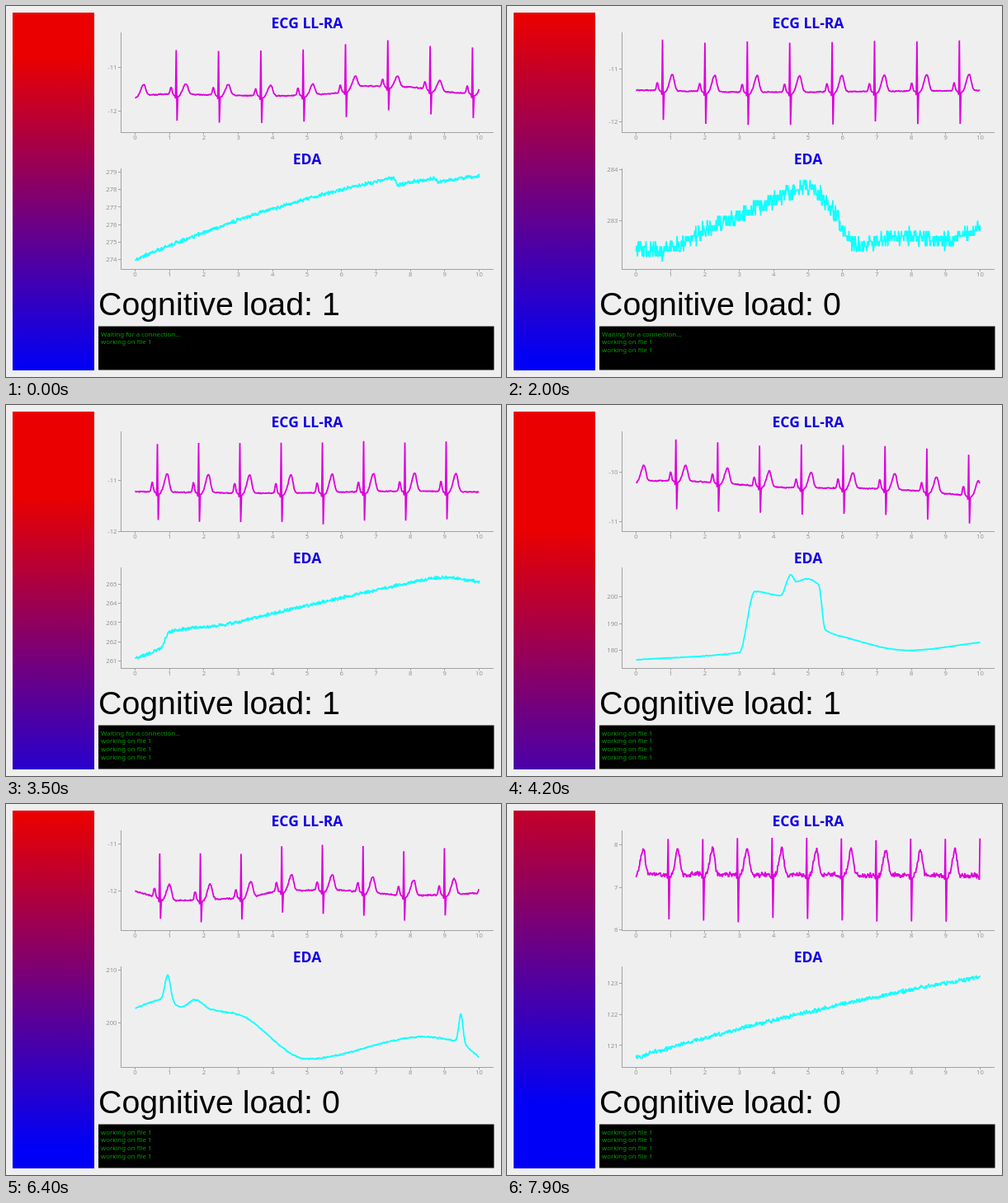
Recreate the animation shown at these times as an HTML page with a canvas. Size 600 by 450 pixels, loop 8 s.

```html
<!DOCTYPE html>
<html lang="en">
<head>
<meta charset="utf-8">
<title>Cognitive load monitor</title>
<style>
html, body { margin: 0; width: 100%; height: 100%; overflow: hidden; background: #f0eff0; }
canvas { display: block; width: 600px; height: 450px; }
</style>
</head>
<body>
<canvas id="stage" width="600" height="450"></canvas>
<script>
const g = document.getElementById('stage').getContext('2d');
const UI = '"Noto Sans", "Open Sans", sans-serif';
const LOOP = 8000, FIRST = 800, STEP = 1400;
const X0 = 156.5, SECOND = 41.7, X1 = X0 + 10 * SECOND;

const bump = (d, w) => Math.exp(-d * d / (2 * w * w));
const rise = (d, w) => 1 / (1 + Math.exp(-d / w));

function random(seed) {
  let s = seed * 7919 + 17;
  return () => {
    s = (s * 1664525 + 1013904223) % 4294967296;
    return s / 4294967296;
  };
}

// Smooth curve through t, v pairs that never overshoots them.
function curve(...p) {
  const n = p.length / 2, t = i => p[2 * i], v = i => p[2 * i + 1];
  const rate = i => (v(i + 1) - v(i)) / (t(i + 1) - t(i));
  const slope = i => {
    if (i === 0) return rate(0);
    if (i === n - 1) return rate(n - 2);
    const a = rate(i - 1), b = rate(i);
    return a * b > 0 ? 2 * a * b / (a + b) : 0;
  };
  return x => {
    let i = 0;
    while (i < n - 2 && x > t(i + 1)) i++;
    const h = t(i + 1) - t(i), k = (x - t(i)) / h, m = 1 - k;
    return v(i) * (1 + 2 * k) * m * m + slope(i) * h * k * m * m
      + v(i + 1) * k * k * (3 - 2 * k) - slope(i + 1) * h * k * k * m;
  };
}

// bar: where the red-to-blue fade starts and ends
// axis: a tick value, its y, pixels per unit, tick step
// ecg: base is y over seconds; first and gap place the spikes;
//      up, down, p and t are wave heights in pixels
// eda: value over seconds
const scenes = [
  {
    load: 1, bar: [60, 440],
    ecg: {
      axis: [-11, 74, 53, 1], first: 206.3, gap: 51.3, up: 55, down: 29, p: 9, t: 13, noise: 0.8,
      base: curve(0, 109, 1, 107, 4, 109, 5.8, 106, 6.6, 97, 8, 98.5, 9, 104, 10, 107)
    },
    eda: {
      axis: [279, 201, 21.2, 1], noise: 2.3,
      value: t => 273.95 + 0.85 * t - 0.03 * t * t - 0.45 * rise(t - 7.57, 0.02) - 0.25 * rise(t - 8.75, 0.02)
    }
  },
  {
    load: 0, bar: [12, 430],
    ecg: {
      axis: [-11, 76, 64, 1], first: 188.5, gap: 51.4, up: 60, down: 36, p: 10, t: 20, noise: 0.7,
      base: curve(0, 102, 3.5, 104.5, 10, 102.5)
    },
    eda: {
      axis: [284, 198, 62, 1], noise: 9, quant: 6.2,
      value: curve(0, 282.45, 0.7, 282.4, 2, 282.79, 3.4, 283.2, 5, 283.65, 5.7, 283.2, 6.4, 282.5, 7.7, 282.7, 9, 282.6, 10, 282.85)
    }
  },
  {
    load: 1, bar: [110, 510],
    ecg: {
      axis: [-11, 91, 61.5, 1], first: 183.5, gap: 50, up: 60, down: 34, p: 12, t: 22, noise: 0.7,
      base: curve(0, 105, 4, 107, 8, 104.5, 10, 105.5)
    },
    eda: {
      axis: [265, 217, 23.2, 1], noise: 2.1,
      value: curve(0, 261.1, 0.75, 261.65, 1, 262.5, 2.5, 262.85, 4, 263.45, 8, 265.05, 9, 265.35, 10, 265.1)
    }
  },
  {
    load: 1, bar: [150, 575],
    ecg: {
      axis: [-10, 81, 60, 1], first: 204.7, gap: 50.7, up: 51, down: 31, p: 11, t: 19, noise: 0.8,
      base: curve(0, 92, 1, 92, 4.4, 100, 7, 101.5, 10, 111)
    },
    eda: {
      axis: [200, 232, 3.25, 10], noise: 0.4,
      value: curve(0, 176.3, 3, 179, 3.45, 201.8, 4.2, 200.3, 4.5, 208, 4.65, 205.5, 4.95, 206.5, 5.3, 204.5, 5.5, 187.5, 6.1, 184.6, 7.9, 179.8, 10, 182.8)
    }
  },
  {
    load: 0, bar: [55, 510],
    ecg: {
      axis: [-10, 33, 60, 1], first: 184, gap: 47, up: 56, down: 33, p: 10, t: 20, noise: 1.5,
      base: curve(0, 107, 3, 112, 4.6, 104.5, 10, 103)
    },
    eda: {
      axis: [230, 202, 3.9, 10], noise: 0.9,
      value: t => -17 * rise(t - 4.82, 0.001) + curve(0, 229, 0.8, 228.4, 1, 227, 2, 225.6, 3.5, 225.6, 3.9, 221.5, 4.2, 222.6, 5.1, 219.5, 5.5, 221.4, 6.2, 221.1, 6.7, 224.8, 10, 225.9)(t)
    }
  },
  {
    load: 0, bar: [12, 415],
    ecg: {
      axis: [-11, 48, 56.5, 1], first: 186.3, gap: 49.3, up: 55, down: 26, p: 11, t: 19, noise: 1.1,
      base: curve(0, 106, 1.2, 117, 3.3, 113, 4.3, 105, 5.8, 104.5, 8, 111, 10, 108)
    },
    eda: {
      axis: [210, 201, 6.4, 10], noise: 0.9,
      value: t => 4.9 * bump(t - 0.95, 0.08) + 5.4 * bump(t - 9.47, 0.06)
        + curve(0, 202.7, 0.8, 204.3, 1.35, 203, 1.75, 204.3, 2.2, 202.5, 3, 201.5, 5, 193.1, 8.4, 197.3, 9.4, 196.3, 10, 193.4)(t)
    }
  },
  {
    load: 0, bar: [-62, 365],
    ecg: {
      axis: [8, 49, 51.5, 1], first: 195.3, gap: 42, up: 44, down: 53, p: 0, t: 31, noise: 3.3,
      base: curve(0, 85, 10, 87)
    },
    eda: {
      axis: [123, 217, 37.7, 1], noise: 2.6,
      value: t => 120.6 + 0.325 * t - 0.0065 * t * t
    }
  }
];

function ecgPoints(e, seed) {
  const rnd = random(seed), out = [];
  const level = x => {
    let y = e.base((x - X0) / SECOND);
    for (let c = e.first - e.gap; c < X1 + 20; c += e.gap) {
      const d = x - c - 12;
      y -= e.t * bump(d, d < 0 ? 3.3 : 2.3) + e.p * bump(x - c + 6.3, 1.1);
      y += 2.5 * bump(x - c - 2, 3);
    }
    return y;
  };
  let spike = e.first;
  for (let x = X0; x <= X1; x += 0.6) {
    if (x > spike - 1.3) {
      const y = level(spike);
      out.push([spike - 0.8, y + 3], [spike, y - e.up - 4 + rnd() * 4]);
      if (spike < X1 - 1) out.push([spike + 1, y + e.down - 3 + rnd() * 6], [spike + 2, y + 1]);
      x = spike + 2;
      spike += e.gap;
    } else {
      out.push([x, level(x) + (rnd() + rnd() - 1) * e.noise * 1.3]);
    }
  }
  return out;
}

function edaPoints(e, seed) {
  const rnd = random(seed), out = [], [v, y0, unit] = e.axis;
  for (let x = X0; x <= X1; x += 0.5) {
    let y = y0 + (v - e.value((x - X0) / SECOND)) * unit;
    y += (rnd() + rnd() - 1) * e.noise * 1.4;
    if (e.quant) y = Math.round(y / e.quant) * e.quant;
    out.push([x, y]);
  }
  return out;
}

scenes.forEach((s, i) => {
  s.ecg.pts = ecgPoints(s.ecg, i + 1);
  s.eda.pts = edaPoints(s.eda, i + 31);
});

function text(str, x, y, font, color, align = 'left') {
  g.font = font;
  g.fillStyle = color;
  g.textAlign = align;
  g.fillText(str, x, y);
}

function rect(x, y, w, h, color) {
  g.fillStyle = color;
  g.fillRect(x, y, w, h);
}

function plot(title, top, bottom, data, color) {
  const gray = '#a2a2a2', label = '#929292', small = '7.7px ' + UI;
  text(title, 365, top - 5, 'bold 17.5px ' + UI, '#1200e2', 'center');
  rect(139, top, 1, bottom - top, gray);
  rect(139, bottom, 452, 1, gray);
  for (let i = 0; i <= 10; i++) {
    const x = X0 + i * SECOND;
    rect(Math.round(x - 0.5), bottom, 1, 3, gray);
    text(i, x, bottom + 8.8, small, label, 'center');
  }
  const [v, y, unit, step] = data.axis;
  for (let i = 0; y + i * step * unit < bottom + 1; i++) {
    const ty = y + i * step * unit;
    rect(136, Math.round(ty), 3, 1, gray);
    text(v - i * step, 134.5, ty + 3.2, small, label, 'right');
  }
  g.beginPath();
  for (const p of data.pts) g.lineTo(p[0], p[1]);
  g.strokeStyle = color;
  g.lineWidth = 1.8;
  g.lineJoin = 'bevel';
  g.stroke();
}

function draw(t) {
  const n = t < FIRST ? 0 : 1 + Math.floor((t - FIRST) / STEP);
  const s = scenes[n];
  rect(0, 0, 600, 450, '#f0eff0');

  const fade = g.createLinearGradient(0, s.bar[0], 0, s.bar[1]);
  fade.addColorStop(0, '#ea0000');
  fade.addColorStop(1, '#0000f6');
  rect(8, 8, 99, 434, fade);

  plot('ECG LL-RA', 32, 153, s.ecg, '#dc00dc');
  plot('EDA', 197, 319, s.eda, '#10ffff');

  text('Cognitive load: ' + s.load, 112, 375, '39.3px "Liberation Sans", Arial, sans-serif', '#000');

  rect(112, 388.5, 479.5, 53, '#000');
  const lines = ['Waiting for a connection...', ...Array(n + 1).fill('working on file 1')].slice(-4);
  lines.forEach((l, i) => text(l, 115, 400.5 + i * 9.75, '7.85px ' + UI, '#00a000'));
}

const start = performance.now();
function tick() {
  draw((performance.now() - start) % LOOP);
  requestAnimationFrame(tick);
}
tick();
</script>
</body>
</html>
```
